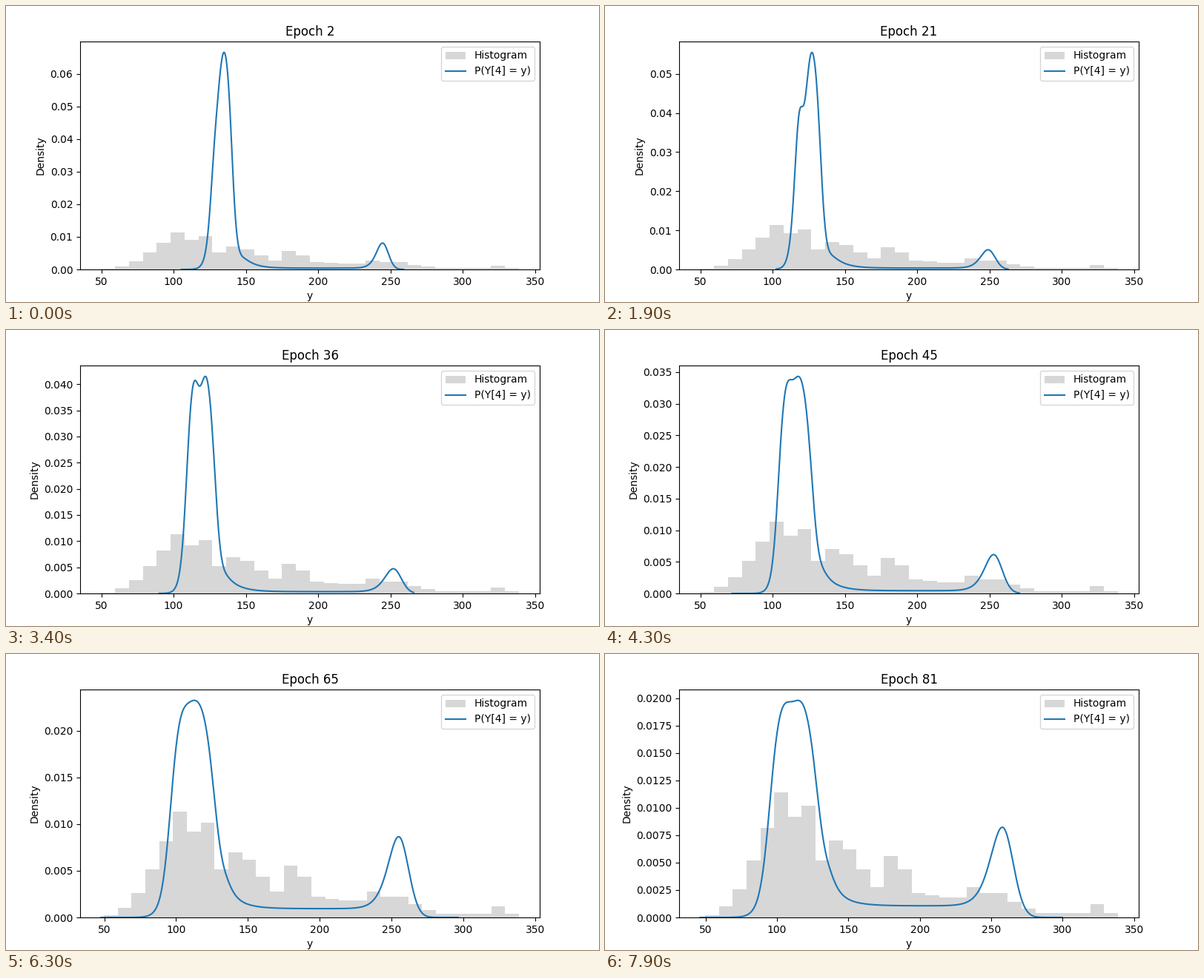
Write a matplotlib script that moves like this. It is 800 px wide and 400 px high and loops after 8 s.

```python
import numpy as np
import matplotlib.pyplot as plt
from matplotlib.animation import FuncAnimation

FRAMES = 80
INTERVAL = 100
X_MIN, X_MAX = 49.8, 338.7

# Samples per histogram bin
COUNTS = np.array([1, 5, 13, 26, 41, 57, 46, 51, 26, 35, 31, 22, 14, 28, 22,
                   11, 10, 9, 9, 14, 11, 11, 7, 4, 2, 2, 2, 2, 6, 2])


def sigmoid(z):
    return 1 / (1 + np.exp(-np.clip(z, -50, 50)))


def gauss(z):
    return np.exp(-z * z / 2)


def sech2(z):
    return 1 / np.cosh(np.clip(z, -50, 50)) ** 2


def track(*keys):
    """Smooth cubic path through a few (step, value) points."""
    t, v = np.array(keys, float).T
    slope = np.gradient(v, t)

    def at(step):
        i = min(np.searchsorted(t, step, side="right") - 1, len(t) - 2)
        h = t[i + 1] - t[i]
        u = (step - t[i]) / h
        ease = u * u * (3 - 2 * u)
        bend = u * (1 - u) * h * ((1 - u) * slope[i] - u * slope[i + 1])
        return v[i] + (v[i + 1] - v[i]) * ease + bend

    return at


peak_at = track((0, .0666), (19, .0555), (34, .0415), (55, .0267),
                (71, .0210), (79, .0198))
left_at = track((0, 127.3), (19, 116.1), (34, 109.1), (55, 98.1), (79, 95.1))
right_at = track((0, 140.2), (19, 133), (34, 128.4), (55, 126.6), (79, 128.6))
notch_at = track((0, 129.7), (19, 121.7), (34, 118.1), (55, 109.1), (79, 110.5))
depth_at = track((0, .14), (19, .25), (34, .12), (43, .05), (79, .045))
far_at = track((0, 244.5), (34, 252), (55, 254), (79, 258.1))
far_height_at = track((0, .121), (19, .09), (34, .113), (55, .29),
                      (71, .419), (79, .409))
start_at = track((0, 105.5), (34, 90), (43, 72), (50, 48.5), (55, 50),
                 (71, 44.9), (79, 46.1))


def density(step):
    left, right, far = left_at(step), right_at(step), far_at(step)
    end = 259 + 0.2 * step + 25 * sigmoid((step - 49) / 3)
    x = np.linspace(start_at(step), end, 500)

    # Main hump: two soft edges with a notch in its top
    left_width = 2.1 + 1.5 * sigmoid((step - 56) / 6)
    right_width = 1.8 + 2.4 * sigmoid((step - 48) / 12)
    notch = gauss((x - notch_at(step)) / (1.25 * left_width))
    main = sigmoid((x - left) / left_width) * sigmoid((right - x) / right_width)
    main *= 1 - depth_at(step) * notch
    main /= main.max()

    # Decaying shoulder, low floor and the far bump
    past = x - right
    tail = 0.18 * np.exp(-np.maximum(past, 0) / (7 + 0.05 * step))
    tail *= sigmoid((past - 7) / 2)
    floor = 0.006 + 0.05 * sigmoid((step - 57) / 7.5)
    floor = floor * sigmoid((past - 2) / 2) * sigmoid((far - 6 - x) / 3)
    d = x - far
    bump = np.where(d < 0, sech2(d / (6 + 0.064 * step)),
                    gauss(d / (4 + 0.043 * step)))

    y = main + tail + floor + far_height_at(step) * bump
    return x, y * peak_at(step) / y.max()


fig, ax = plt.subplots(figsize=(8, 4), dpi=100)
edges = np.linspace(X_MIN, X_MAX, len(COUNTS) + 1)
widths = np.diff(edges)
bars = ax.bar(edges[:-1], COUNTS / (COUNTS.sum() * widths), width=widths,
              align="edge", color="#d7d7d7", label="Histogram")
line, = ax.plot([], [], color="tab:blue", label="P(Y[4] = y)")
ax.set_xlabel("y")
ax.set_ylabel("Density")
ax.legend(handles=[bars, line], loc="upper right")
title = ax.set_title("")


def update(step):
    x, y = density(step)
    line.set_data(x, y)
    low = min(X_MIN, x[0])
    margin = 0.05 * (X_MAX - low)
    ax.set_xlim(low - margin, X_MAX + margin)
    ax.set_ylim(0, 1.05 * y.max())
    title.set_text(f"Epoch {step + 2}")
    return line, title


anim = FuncAnimation(fig, update, frames=FRAMES, interval=INTERVAL,
                     repeat=True, repeat_delay=0, blit=False)
plt.show()
```
